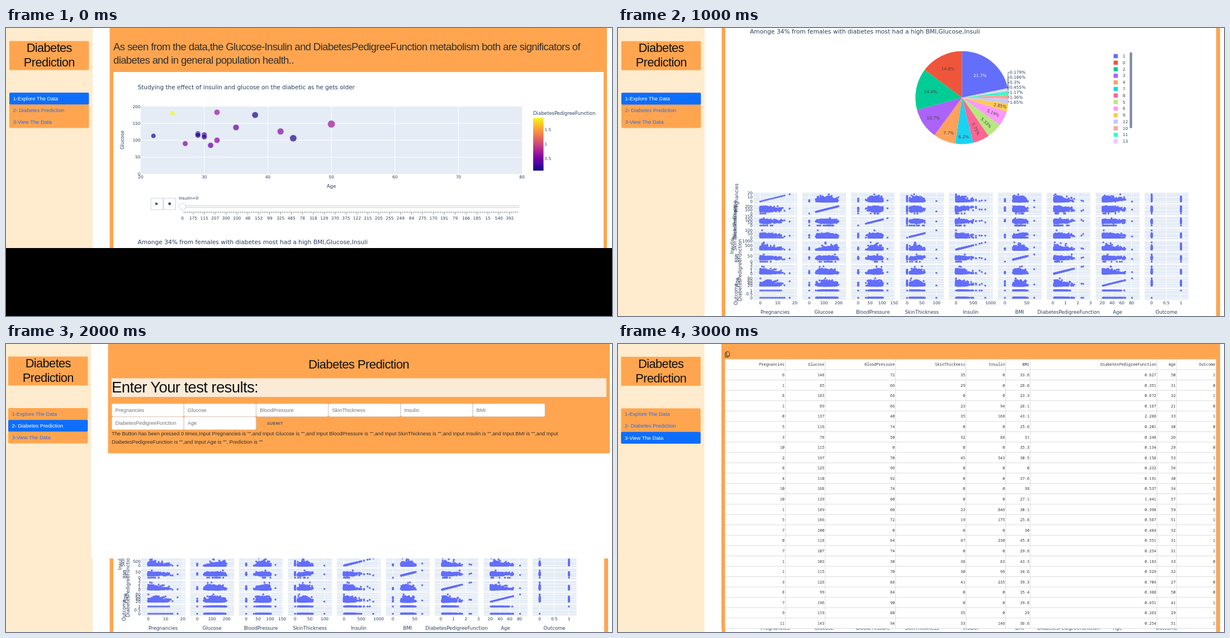
Write an HTML page with a canvas that moves like this. It is 1084 px wide and 517 px high and loops after 4000 ms.

```html
<!DOCTYPE html>
<html lang="en">
<head>
<meta charset="utf-8">
<title>Diabetes Prediction</title>
<style>
html, body { margin: 0; width: 100%; height: 100%; overflow: hidden; background: #000; }
.scene, .scene > * { position: absolute; left: 0; top: 0; width: 1084px; height: 517px; }
.scene { overflow: hidden; }
#explore { height: 395px; }
#form { height: 385px; }
#table { height: 511px; }
#charts { animation: from1 4s step-end infinite; }
#form { animation: from2 4s step-end infinite; }
#table { animation: from3 4s step-end infinite; }
@keyframes from1 { 0% { visibility: hidden } 25%, 100% { visibility: visible } }
@keyframes from2 { 0% { visibility: hidden } 50% { visibility: visible } 75%, 100% { visibility: hidden } }
@keyframes from3 { 0% { visibility: hidden } 75%, 100% { visibility: visible } }
text { white-space: pre; }
.a { font-family: "Liberation Sans", Arial, sans-serif; }
.v { font-family: "DejaVu Sans", Verdana, sans-serif; }
.m { font-family: "Noto Sans Mono", "DejaVu Sans Mono", monospace; }
.h { letter-spacing: -.605px; }
</style>
</head>
<body>
<div class="scene" id="explore"></div>
<div class="scene" id="charts"></div>
<div class="scene" id="form"></div>
<div class="scene" id="table"></div>
<script>
const ORANGE = '#ffa54f', CREAM = '#ffebcd', BLUE = '#0d6efd', INK = '#2a3f5f', PALE = '#e5ecf6', DOT = '#636efa';

const rect = (x, y, x2, y2, fill, more = '') =>
  `<rect x="${x}" y="${y}" width="${x2 - x}" height="${y2 - y}" fill="${fill}" ${more}/>`;
const line = (x, y, x2, y2, color, w = 1) =>
  `<path d="M${x} ${y}L${x2} ${y2}" stroke="${color}" stroke-width="${w}"/>`;
// y is the middle of the capitals
const text = (s, x, y, size, cls = 'v', fill = INK, anchor = 'start', turn = 0, more = '') =>
  `<text class="${cls}" x="${x}" y="${y + size * .36}" font-size="${size}" fill="${fill}" text-anchor="${anchor}"` +
  (turn ? ` transform="rotate(${turn} ${x} ${y})"` : '') + ` ${more}>${s}</text>`;
const mid = (s, x, y, size = 7.4, fill = INK, turn = 0) => text(s, x, y, size, 'v', fill, 'middle', turn);
const end = (s, x, y, size = 7.4) => text(s, x, y, size, 'v', INK, 'end');

function show(id, body) {
  document.getElementById(id).innerHTML = `<svg viewBox="0 0 1084 517" fill="none">${body}</svg>`;
}

function sidebar(width, x, y, active) {
  let out = rect(0, 0, width, 517, CREAM) + rect(x, y, x + 142.3, y + 52, ORANGE);
  ['Diabetes', 'Prediction'].forEach((s, i) => {
    out += text(s, x + 71.3, y + 11.8 + i * 26, 21.8, 'a h', '#111', 'middle');
  });
  const top = y + 92.6;
  out += rect(x, top, x + 142.3, top + 63.3, ORANGE, 'rx="2"');
  ['1-Explore The Data', '2- Diabetes Prediction', '3-View The Data'].forEach((s, i) => {
    const ty = top + i * 21.1, on = i === active;
    if (on) out += rect(x, ty, x + 142.3, ty + 21.1, BLUE, 'rx="2"');
    out += text(s, x + 6.4, ty + 10.4, 9.35, 'a', on ? '#fff' : '#2a6cf0');
  });
  return out;
}

const females = 'Amonge 34% from females with diabetes most had a high BMI,Glucose,Insuli';
const white = rect(0, 0, 1084, 517, '#fff');

function explore() {
  let out = white + sidebar(155, 6, 23.5, 0) +
    rect(185.5, 0, 1075, 395, ORANGE) + rect(192, 79, 1069, 395, '#fff') +
    text('As seen from the data,the Glucose-Insulin and DiabetesPedigreeFunction metabolism both are significators of', 192, 33.2, 18.5, 'a h', '#32302e') +
    text('diabetes and in general population health..', 192, 57.4, 18.5, 'a h', '#32302e') +
    text('Studying the effect of insulin and glucose on the diabetic as he gets older', 235.5, 106, 10.5) +
    text(females, 235.5, 384.5, 10.68);

  const px = age => 241 + (age - 20) * 11.367, py = g => 262 - g * .605;
  out += rect(241, 141, 923, 262, PALE);
  for (let a = 20; a <= 80; a += 10) {
    if (a > 20 && a < 80) out += line(px(a), 141, px(a), 262, '#fff');
    out += mid(a, px(a), 267.5);
  }
  for (let g = 0; g <= 200; g += 50) {
    if (g > 0 && g < 200) out += line(241, py(g), 923, py(g), '#fff');
    out += end(g, 240.5, py(g));
  }
  out += mid('Age', 582, 283.5, 8.55) + mid('Glucose', 208, 201, 8.55, INK, -90);

  const dot = (age, g, r, color) =>
    out += `<circle cx="${px(age)}" cy="${py(g)}" r="${r}" fill="${color}" fill-opacity=".72" stroke="${PALE}" stroke-width=".6"/>`;
  dot(25, 180, 4.5, '#f0f921');
  dot(32, 183, 5.2, '#9c179e');
  dot(38, 175, 5.7, '#26058f');
  dot(50, 148, 6.7, '#9c179e');
  dot(35, 138, 5.5, '#6a01a6');
  dot(42, 126, 5.9, '#8a0da3');
  dot(44, 106, 6.2, '#26058f');
  dot(22, 113, 4.3, '#26058f');
  dot(29, 119, 4.9, '#2d0594');
  dot(29, 115, 4.9, '#2d0594');
  dot(30, 116, 4.9, '#2d0594');
  dot(30, 110, 4.9, '#2d0594');
  dot(27, 90, 4.8, '#8207a4');
  dot(32, 100, 5.2, '#8207a4');
  dot(31, 85, 5.2, '#6a01a6');

  const plasma = '0d0887 46039f 7201a8 9c179e bd3786 d8576b ed7953 fb9f3a fdca26 f0f921'.split(' ');
  out += '<linearGradient id="bar" x1="0" x2="0" y1="1" y2="0">' +
    plasma.map((c, i) => `<stop offset="${i / 9}" stop-color="#${c}"/>`).join('') + '</linearGradient>' +
    rect(943, 161.3, 961.5, 256, 'url(#bar)') + text('DiabetesPedigreeFunction', 943, 152.5, 8.55);
  [1.5, 1, .5].forEach((v, i) => out += text(v, 963.5, 182 + i * 26, 7.4));

  const edge = 'stroke="#bec8d9" stroke-width=".8"';
  out += rect(259.3, 305.8, 281, 326, '#fff', edge) + rect(282, 305.8, 303.5, 326, '#fff', edge) +
    `<path d="M267.3 312.8V318.2L272.4 315.5Z" fill="${INK}"/>` + rect(290.6, 313.4, 294.8, 317.6, INK) +
    text('Insulin=0', 309, 305.5, 7.4) +
    rect(312, 318.8, 918, 322.4, '#f8fafc', edge + ' rx="1.8"') +
    `<circle cx="315.5" cy="320.6" r="6.2" fill="#fff" ${edge}/>`;
  for (let i = 1; i < 185; i++) {
    const x = 315.5 + i * 3.253;
    out += line(x, 329.5, x, i % 6 ? 332.2 : 334.4, '#333', .7);
  }
  '0 175 115 207 300 100 48 152 99 325 485 78 318 129 370 375 122 215 205 255 249 84 275 170 191 79 166 185 15 540 392'
    .split(' ').forEach((s, i) => out += mid(s, 315.5 + i * 19.52, 341.5));
  show('explore', out);
}

// name, low, high, tick step, y title place
const vars = [
  ['Pregnancies', 0, 17, 10, 212], ['Glucose', 0, 199, 100, 209], ['BloodPressure', 0, 122, 50, 209],
  ['SkinThickness', 0, 99, 50, 209], ['Insulin', 0, 846, 500, 204], ['BMI', 0, 67.1, 50, 213],
  ['DiabetesPedigreeFunction', .078, 2.42, 1, 217.5], ['Age', 21, 81, 20, 213], ['Outcome', 0, 1, .5, 211]
];
const cellX = i => 242 + i * 87.5, cellY = i => 295 + i * 21.6;
const share = (i, v) => (v - vars[i][1]) / (vars[i][2] - vars[i][1]);
const atX = (i, v) => cellX(i) + 12.6 + share(i, v) * 52.4;
const atY = (i, v) => cellY(i) + 16.4 - share(i, v) * 13;

function ticks(i, vertical) {
  const list = [], step = vars[i][3];
  for (let v = 0; v <= step * 5; v += step) {
    const p = vertical ? atY(i, v) : atX(i, v), a = vertical ? cellY(i) : cellX(i);
    if (p >= a - .5 && p <= a + (vertical ? 20 : 79)) list.push([v, p]);
  }
  return list;
}

function pie() {
  const cx = 615.5, cy = 125, r = 83.5;
  const slices = [
    [21.7, DOT], [.179, '#ffc2db'], [.186, '#7ae6f8'], [.3, '#ffd9c0'], [.455, '#e4c8fe'], [1.17, '#33ffc9'],
    [1.36, '#f7a799'], [1.65, '#c5c9fd'], [2.85, '#fecb52'], [5.19, '#ff97ff'], [5.33, '#b6e880'],
    [5.75, '#ff6692'], [6.2, '#19d3f3'], [7.7, '#ffa15a'], [10.7, '#ab63fa'], [14.4, '#00cc96'], [14.8, '#ef553b']
  ];
  const total = slices.reduce((n, s) => n + s[0], 0);
  const point = a => `${cx + r * Math.sin(a)} ${cy - r * Math.cos(a)}`;
  let sum = 0, out = '', leads = '';
  slices.forEach(([n, color], i) => {
    const a = sum / total * 2 * Math.PI, b = (sum += n) / total * 2 * Math.PI;
    out += `<path d="M${cx} ${cy}L${point(a)}A${r} ${r} 0 0 1 ${point(b)}Z" fill="${color}"/>`;
    if (i > 0 && i < 8) {
      const y = 79.5 + (i - 1) * 8.9;
      leads += `<path d="M${point((a + b) / 2)}L697.8 ${y}H700.5" stroke="${INK}" stroke-width=".7"/>` +
        text(n + '%', 700.8, y, 7.4);
    }
  });
  const label = (s, x, y, turn = 0, fill = '#444') => mid(s, x, y, 7.4, fill, turn);
  return out + leads + label('21.7%', 647.5, 85.5, 0, '#fff') + label('14.8%', 590, 73.5) + label('14.4%', 559, 114) +
    label('10.7%', 564, 161) + label('7.7%', 591.5, 188) + label('6.2%', 618.5, 195.5) + label('5.75%', 640, 181, 64) +
    label('5.33%', 658.5, 170, 44) + label('5.19%', 671, 152.5, 24) + label('2.85%', 683.5, 139.5, 10);
}

function charts() {
  let out = white + sidebar(155, 6, 23.7, 0) + rect(185.5, 0, 192, 517, ORANGE) + rect(1070, 0, 1077, 517, ORANGE) +
    text(females, 236, 6.5, 10.68) + pie();
  const key = [[1, DOT], [0, '#ef553b'], [2, '#00cc96'], [3, '#ab63fa'], [4, '#ffa15a'], [7, '#19d3f3'], [8, '#ff6692'],
    [5, '#b6e880'], [6, '#ff97ff'], [9, '#fecb52'], [12, '#c5c9fd'], [10, '#f7a799'], [11, '#33ffc9'], [13, '#e4c8fe']];
  key.forEach(([s, color], i) => {
    const y = 50.5 + i * 11.77;
    out += rect(886.5, y - 3.7, 894, y + 3.7, color) + text(s, 902.8, y, 7.4);
  });
  out += rect(915.3, 43.5, 919.7, 180, '#808ba4', 'rx="2"');
  vars.forEach(([name, , , , x], i) => {
    ticks(i).forEach(([v, p]) => out += mid(v, p, 493));
    ticks(i, true).forEach(([v, p]) => out += end(v, 241, p));
    out += mid(name, cellX(i) + 39, 509.5, 8.55) + mid(name, x, cellY(i) + 10, 8.55, INK, -90);
  });
  show('charts', out);
  matrix();
}

function people() {
  let seed = 7;
  const rnd = () => (seed = (seed * 16807) % 2147483647) / 2147483647;
  const bell = () => Math.sqrt(-2 * Math.log(rnd())) * Math.cos(2 * Math.PI * rnd());
  // a value past its limits lands somewhere between them, so no edge piles up
  const keep = (v, a, b) => v < a || v > b ? a + rnd() * (b - a) * .8 : v;
  const rows = [];
  for (let i = 0; i < 768; i++) {
    const age = Math.floor(keep(21 - Math.log(rnd()) * 11.5, 21, 70));
    const sugar = bell(), bulk = bell();
    rows.push([
      Math.floor(keep((age - 21) * .09 - Math.log(rnd()) * 2.5, 0, 15)),
      rnd() < .007 ? 0 : Math.round(keep(121 + sugar * 31, 44, 199)),
      rnd() < .045 ? 0 : Math.round(keep(72 + bell() * 12.4, 24, 114)),
      rnd() < .3 ? 0 : Math.round(keep(29 + bulk * 7 + bell() * 7, 7, 63)),
      rnd() < .49 ? 0 : Math.round(keep(Math.exp(4.75 + sugar * .45 + bell() * .5), 14, 600)),
      rnd() < .014 ? 0 : keep(32.4 + bulk * 6 + bell() * 3.5, 18.2, 59),
      keep(Math.exp(-1 + bell() * .62), .085, 1.8),
      age,
      rnd() < .35 + sugar * .15 ? 1 : 0
    ]);
  }
  const put = (i, k, v) => rows[i][k] = v;
  put(0, 0, 17); put(1, 3, 99); put(2, 4, 846); put(3, 4, 744); put(4, 5, 67.1);
  put(5, 6, 2.42); put(6, 6, 2.29); put(7, 7, 81); put(8, 2, 122); put(9, 4, 680);
  return rows;
}

function matrix() {
  const canvas = document.createElement('canvas');
  canvas.width = 1084;
  canvas.height = 517;
  document.getElementById('charts').append(canvas);
  const c = canvas.getContext('2d'), rows = people();
  for (let j = 0; j < 9; j++) for (let i = 0; i < 9; i++) {
    const x = cellX(i), y = cellY(j);
    c.fillStyle = PALE;
    c.fillRect(x, y, 78.5, 19.8);
    c.fillStyle = '#fff';
    ticks(i).forEach(([, p]) => c.fillRect(p - .4, y, .8, 19.8));
    ticks(j, true).forEach(([, p]) => c.fillRect(x, p - .4, 78.5, .8));
    c.fillStyle = DOT;
    const seen = new Set();
    for (const row of rows) {
      const px = atX(i, row[i]), py = atY(j, row[j]), id = px.toFixed(1) + ' ' + py.toFixed(1);
      if (seen.has(id)) continue;
      seen.add(id);
      c.beginPath();
      c.arc(px, py, 1.75, 0, 7);
      c.fill();
    }
  }
}

function form() {
  let out = white + sidebar(152, 4, 22.5, 1) + rect(182.5, 0, 1080, 196.3, ORANGE) +
    text('Diabetes Prediction', 631, 36.2, 22.1, 'a h', '#111', 'middle') +
    rect(189, 61.5, 1074, 95, '#faebd7') +
    text('Enter Your test results:', 189, 77.5, 27.5, 'a h', '#111');
  ['Pregnancies', 'Glucose', 'BloodPressure', 'SkinThickness', 'Insulin', 'BMI', 'DiabetesPedigreeFunction', 'Age'].forEach((s, i) => {
    const x = 189 + i % 6 * 129.2, y = i < 6 ? 107.2 : 130.8;
    out += rect(x + .3, y, x + 128.9, y + 23, '#fff', 'rx="2.4" stroke="#d1d1d1" stroke-width=".7"') +
      text(s, x + 6.6, y + 11.2, 9.25, 'a', '#757575');
  });
  out += rect(448.5, 131, 515.3, 153.6, 'none', 'rx="2.4" stroke="#bbb" stroke-opacity=".6" stroke-width=".7"') +
    text('SUBMIT', 467, 142.5, 6.6, 'a', '#555', 'start', 0, 'font-weight="700" letter-spacing=".6"') +
    text('The Button has been pressed 0 times,Input Pregnancies is "",and Input Glucose is "",and Input BloodPressure is "",and Input SkinThickness is "",and Input Insulin is "",and Input BMI is "",and Input', 189, 160.8, 9.25, 'a', '#32302e') +
    text('DiabetesPedigreeFunction is "",and Input Age is "", Prediction is ""', 189, 175.8, 9.25, 'a', '#32302e');
  show('form', out);
}

function table() {
  const GRID = '#d3d3d3', rowY = i => 27 + i * 18.58;
  let out = white + sidebar(154.5, 5.5, 23, 2) + rect(185, 0, 1077, 517, ORANGE) + rect(191.5, 27, 1070, 511, '#fff');
  out += '<path d="M193.5 15.8H191.8V23.5H197.3V21.8M194 13.8H197.6L199.6 15.8V21.4H194Z" stroke="#333" stroke-width="1"/>';
  for (let i = 0; i <= 26; i++) out += line(191.5, rowY(i) + .4, 1070, rowY(i) + .4, GRID, .8);
  out += line(191.7, 27, 191.7, 511, GRID, .8);
  const col = (name, x, values) => {
    [name, ...values.split(' ')].forEach((s, i) => {
      out += text(s, x - 1.4, i ? 55.6 + (i - 1) * 18.58 : 36.2, 6.95, 'm', '#333', 'end');
    });
    out += line(x, 27, x, 511, GRID, .8);
  };
  col('Pregnancies', 299.4, '6 1 8 1 0 5 3 10 2 8 4 10 10 1 5 7 0 7 1 1 3 8 7 9 11');
  col('Glucose', 370.6, '148 85 183 89 137 116 78 115 197 125 110 168 139 189 166 100 118 107 103 115 126 99 196 119 143');
  col('BloodPressure', 496.6, '72 66 64 66 40 74 50 0 70 96 92 74 80 60 72 0 84 74 30 70 88 84 90 80 94');
  col('SkinThickness', 622.5, '35 29 0 23 35 0 32 0 45 0 0 0 0 23 19 0 47 0 38 30 41 0 0 35 33');
  col('Insulin', 693.6, '0 0 0 94 168 0 88 0 543 0 0 0 0 846 175 0 230 0 83 96 235 0 0 0 146');
  col('BMI', 737.2, '33.6 26.6 23.3 28.1 43.1 25.6 31 35.3 30.5 0 37.6 38 27.1 30.1 25.8 30 45.8 29.6 43.3 34.6 39.3 35.4 39.8 29 36.6');
  col('DiabetesPedigreeFunction', 964.2, '0.627 0.351 0.672 0.167 2.288 0.201 0.248 0.134 0.158 0.232 0.191 0.537 1.441 0.398 0.587 0.484 0.551 0.254 0.183 0.529 0.704 0.388 0.451 0.263 0.254');
  col('Age', 998.8, '50 31 32 21 33 30 26 29 53 54 30 34 57 59 51 32 31 31 33 32 27 50 41 29 51');
  col('Outcome', 1069.8, '1 0 1 0 1 0 1 0 1 1 0 1 0 1 1 1 1 1 0 1 0 0 1 1 1');
  show('table', out);
}

explore();
charts();
form();
table();
</script>
</body>
</html>
```
